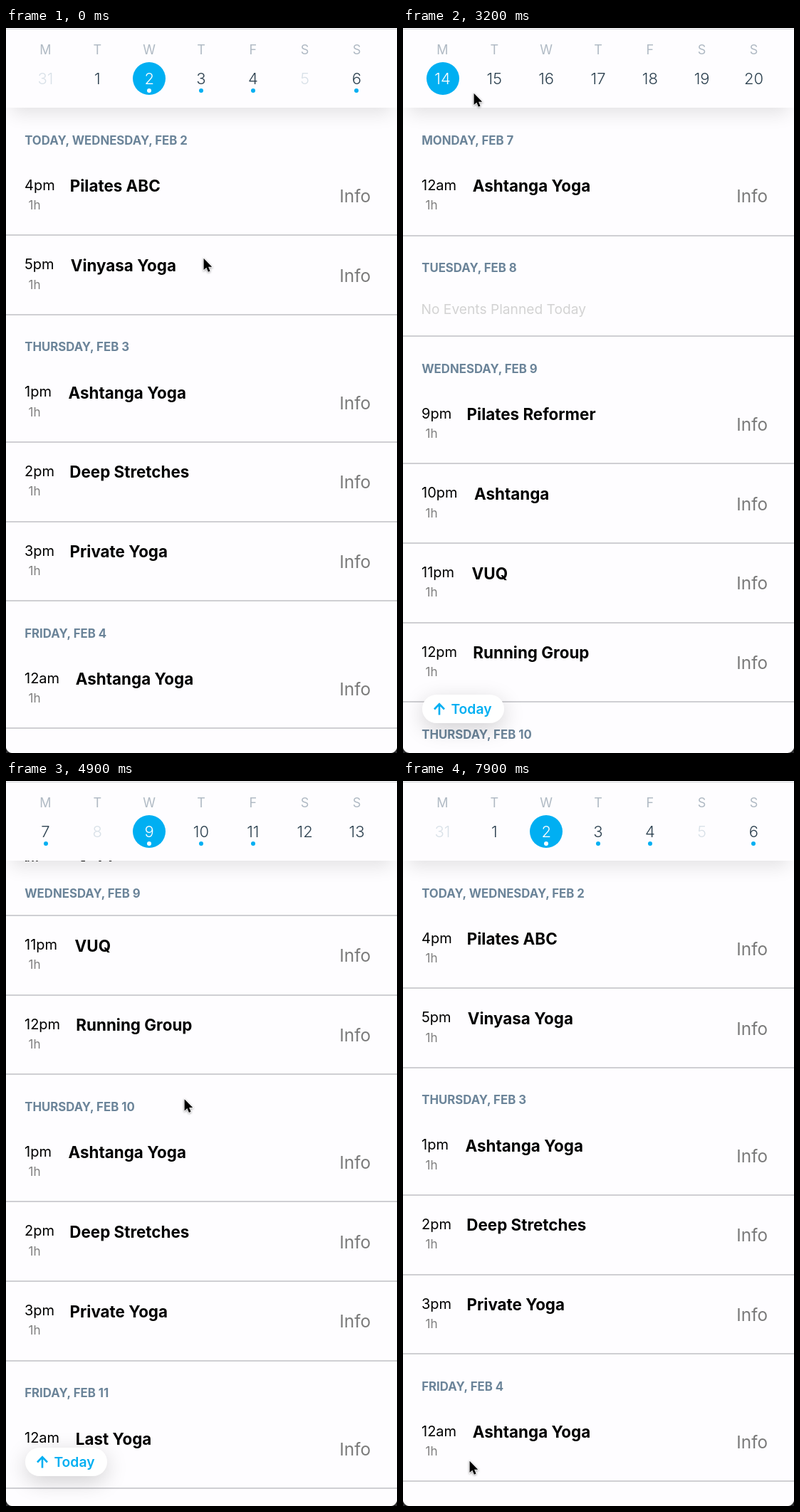
An HTML page that plays this animation: 549 by 1019 pixels, repeating every 8300 ms.

```html
<!DOCTYPE html>
<html lang="en">
<head>
<meta charset="utf-8">
<title>Class agenda</title>
<style>
html, body { margin: 0; width: 100%; height: 100%; overflow: hidden; background: #2a2a2c; }
body { font-family: Inter, "Open Sans", sans-serif; font-optical-sizing: none; }
#stage { position: absolute; width: 549px; height: 1019px; overflow: hidden; background: #fefdff; border-radius: 0 0 9px 9px; }
#head { position: absolute; z-index: 2; width: 549px; height: 112px; background: #fefdff; box-shadow: 0 16px 24px -8px rgba(0, 0, 0, .11); }
#head::before { content: ""; position: absolute; top: 1px; width: 100%; height: 1px; background: #d2d2d6; }
#clip { position: absolute; top: 40px; width: 549px; height: 72px; overflow: hidden; }
#strip { position: absolute; }
#list { position: absolute; top: 112px; width: 549px; height: 907px; overflow: hidden; }
.section { position: relative; }
/* The clear top border lets the divider above show in full */
.title { position: sticky; top: 0; z-index: 1; box-sizing: border-box; height: 67.6px; border-top: 1px solid transparent; background: #fefdff padding-box; }
.row, .none { position: relative; height: 111.6px; }
.none { height: 74.2px; }
.row::after, .none::after { content: ""; position: absolute; bottom: -1px; width: 100%; height: 2px; background: #cfcfd3; }
.t { position: absolute; line-height: 0; white-space: nowrap; }
.caption { font-size: 16.8px; font-weight: 700; color: #6b8499; }
.time { font-size: 20px; }
.hours { font-size: 17.2px; color: #808080; }
.name { font-size: 22.4px; font-weight: 700; }
.info { font-size: 24.3px; color: #7a7a7a; }
.empty { font-size: 19.2px; color: #d3d3d3; }
.letter, .num { width: 72px; text-align: center; }
.letter { font-size: 18px; color: #b0bac4; }
.num { font-size: 22px; font-weight: 350; color: #2d4150; }
.num.off { color: #d9e1e8; }
.num.on { color: #fff; }
.num.on::before { content: ""; position: absolute; z-index: -1; left: 13px; top: -22.5px; width: 46px; height: 46px; border-radius: 50%; background: #00aff2; }
.num.dot::after { content: ""; position: absolute; left: 33px; top: 14.5px; width: 6px; height: 6px; border-radius: 50%; background: #00aff2; }
.num.on::after { background: #fff; }
#today { position: absolute; z-index: 3; left: 27px; top: 937px; width: 115px; height: 40px; border-radius: 20px; background: #fff; box-shadow: 0 8px 30px rgba(0, 0, 0, .18); color: #00aff2; font-size: 19.3px; font-weight: 600; }
#today svg { position: absolute; left: 0; top: 0; }
#cursor { position: absolute; z-index: 4; left: 0; top: 0; overflow: visible; filter: drop-shadow(0 1px 1.5px rgba(0, 0, 0, .4)); }
</style>
</head>
<body>
<div id="stage">
  <div id="list"></div>
  <div id="head"><div id="clip"><div id="strip"></div></div></div>
  <div id="today"><div id="label">
    <svg width="60" height="40" fill="none" stroke="#00aff2" stroke-width="2.6"><path d="M24 28.5V13.5M17 20.5L24 13.2L31 20.5"/></svg>
    <div class="t" style="left:40.4px;top:20px">Today</div>
  </div></div>
  <svg id="cursor" width="16" height="24"><path transform="translate(.6 .8) scale(.88)" d="M0 0V18.5L4.3 14.7L7.2 21.4L10.2 20.1L7.4 13.5H13.2Z" stroke="#fff" stroke-width="1.6" paint-order="stroke"/></svg>
</div>
<script>
const LOOP = 8300, STEP = 100, PAGE = 552;
const $ = id => document.getElementById(id);
const WEEKDAYS = ['MONDAY', 'TUESDAY', 'WEDNESDAY', 'THURSDAY', 'FRIDAY', 'SATURDAY', 'SUNDAY'];

// Classes by day of February: time, name, left edge of the name
const core = [['1pm', 'Ashtanga Yoga', 87.5], ['2pm', 'Deep Stretches', 89.3], ['3pm', 'Private Yoga', 89.6]];
const midnight = name => [['12am', name, 97.8]];
const classes = {
  2: [['4pm', 'Pilates ABC', 89.8], ['5pm', 'Vinyasa Yoga', 90.7]],
  3: core,
  4: midnight('Ashtanga Yoga'),
  6: midnight('Deep Stretches'),
  7: midnight('Ashtanga Yoga'),
  9: [['9pm', 'Pilates Reformer', 89.6], ['10pm', 'Ashtanga', 100], ['11pm', 'VUQ', 96.6], ['12pm', 'Running Group', 98.3]],
  10: core,
  11: midnight('Last Yoga')
};

function add(parent, cls, text = '') {
  const el = document.createElement('div');
  el.className = cls;
  el.textContent = text;
  return parent.appendChild(el);
}
function label(parent, cls, x, y, text, side = 'left') {
  const el = add(parent, 't ' + cls, text);
  el.style[side] = x + 'px';
  el.style.top = y + 'px';
  return el;
}

// Agenda
const tops = {};
let height = 0;
for (let day = 2; day <= 13; day++) {
  const section = add($('list'), 'section');
  const caption = `${day === 2 ? 'TODAY, ' : ''}${WEEKDAYS[day % 7]}, FEB ${day}`;
  label(add(section, 'title'), 'caption', 26.2, 44.5, caption);
  tops[day] = height;
  height += 67.6;
  for (const [time, name, x] of classes[day] || []) {
    const row = add(section, 'row');
    label(row, 'time', 26, 41, time);
    label(row, 'hours', 31.5, 69.4, '1h');
    label(row, 'name', x, 42.5, name);
    label(row, 'info', 37, 56.4, 'Info', 'right');
    height += 111.6;
  }
  if (!classes[day]) {
    label(add(section, 'none'), 'empty', 25.5, 36.4, 'No Events Planned Today');
    height += 74.2;
  }
}

// Week strip
const columnX = i => 19.5 + 72.83 * i;
WEEKDAYS.forEach((name, i) => label($('head'), 'letter', columnX(i), 30.5, name[0]));
const days = Array.from({ length: 21 }, (_, day) => {
  const x = columnX(day % 7) + PAGE * Math.floor(day / 7);
  const el = label($('strip'), 'num', x, 30.5, day || 31);
  el.style.zIndex = 0;
  el.classList.toggle('off', [0, 5, 8].includes(day));
  el.classList.toggle('dot', day in classes);
  return el;
});

// Value at time t on a path of [time, value] points
const linear = p => p;
const smooth = p => p * p * (3 - 2 * p);
function track(t, points, ease = smooth) {
  const next = points.findIndex(p => p[0] > t);
  if (next < 0) return points[points.length - 1][1];
  if (next === 0) return points[0][1];
  const [t0, a] = points[next - 1], [t1, b] = points[next];
  return a + (b - a) * ease((t - t0) / (t1 - t0));
}

const week = tops[7];
const scrollPath = [[1400, 0], [1650, week], [3700, week], [4500, week + 545], [4650, week + 545], [5400, week + 508.4], [6300, week + 508.4], [6700, 0]];
const swipePath = [[700, 0], [1100, 262], [1450, PAGE], [2200, PAGE], [2600, PAGE + 300], [2950, PAGE * 2]];
const cursorPath = [
  [0, 277, 323], [100, 433, 70], [700, 433, 70], [1100, 142, 69], [1400, 118, 72], [1600, 432, 88],
  [1700, 442, 91], [2200, 442, 91], [2700, 99, 91], [3200, 99, 91], [3400, 180, 348], [3600, 266, 747],
  [3700, 266, 747], [4200, 245, 434], [4650, 245, 434], [5400, 260, 471], [5500, 260, 471],
  [5800, 84, 939], [6000, 84, 939], [6200, 93, 955]
];
const cursorX = cursorPath.map(([t, x]) => [t, x]);
const cursorY = cursorPath.map(([t, , y]) => [t, y]);
const buttonPath = [[1400, 90], [1650, 0], [6300, 0], [6800, 90]];
const dimPath = [[3700, 1], [3900, .7], [4200, .7], [4600, 1], [6200, 1], [6400, .6]];

function stripOffset(t) {
  if (t > 6300) return 0;
  return t > 3700 ? PAGE : track(t, swipePath);
}
function selectedDay(t, scroll) {
  if (t < 1450 || t > 6300) return 2;
  if (t < 3000) return 7;
  if (t <= 3700) return 14;
  return Math.max(...Object.keys(tops).filter(day => tops[day] <= scroll + 1));
}

function draw(now) {
  const t = Math.floor(now % LOOP / STEP) * STEP;
  const scroll = track(t, scrollPath);
  const selected = selectedDay(t, scroll);
  $('list').scrollTop = scroll;
  $('strip').style.transform = `translateX(${-stripOffset(t)}px)`;
  days.forEach((el, day) => el.classList.toggle('on', day === selected));
  const drop = track(t, buttonPath);
  $('today').style.transform = `translateY(${drop}px)`;
  $('today').style.visibility = drop < 90 ? 'visible' : 'hidden';
  $('label').style.opacity = track(t, dimPath);
  $('cursor').style.transform = `translate(${track(t, cursorX, linear)}px, ${track(t, cursorY, linear)}px)`;
}

let start;
function frame(now) {
  start ??= now;
  draw(now - start);
  requestAnimationFrame(frame);
}
draw(0);
requestAnimationFrame(frame);
</script>
</body>
</html>
```
